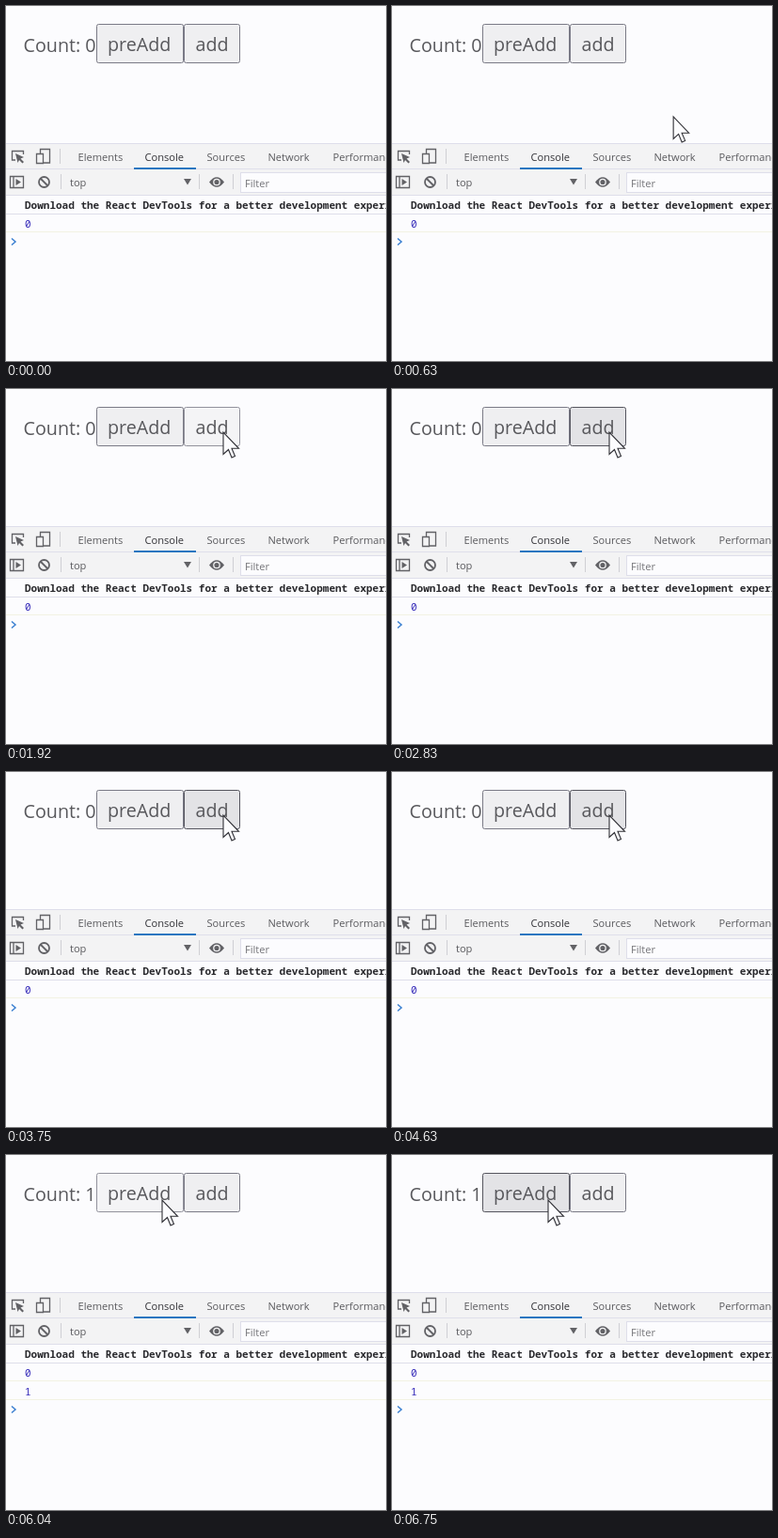
An HTML page that plays this animation: 404 px wide and 378 px high, repeating every 8000 ms.

```html
<!DOCTYPE html>
<html lang="en">
<head>
<meta charset="utf-8">
<title>Counter with console</title>
<style>
html, body { margin: 0; width: 100%; height: 100%; overflow: hidden; background: #fcfcfe; }
svg { display: block; }
text { font-family: "Open Sans", "Noto Sans", sans-serif; font-size: 11.1px; fill: #5a5a5e; white-space: pre; }
.big { font-size: 19.7px; fill: #58585c; }
.mono { font-family: "Noto Sans Mono", "DejaVu Sans Mono", monospace; font-size: 11px; fill: #28282c; }
.warn { font-weight: 600; }
.num { fill: #3328b8; }
.bar { fill: #f3f3f4; }
.rule { stroke: #dedeea; }
.row { stroke: #f2f2e2; }
.sep { stroke: #cfcfd4; }
.icon { fill: none; stroke: #626266; stroke-width: 1.3; }
.solid { fill: #626266; }
.button { fill: #efeff1; stroke: #7a7a86; }
.button.hover { fill: #e3e3e6; stroke: #55555e; }
.button.press { fill: #f4f4f6; stroke: #92929c; }
</style>
</head>
<body>
<svg width="404" height="378" viewBox="0 0 404 378">
  <text class="big" x="18.5" y="49">Count: <tspan id="count">0</tspan></text>
  <rect class="button" id="preAdd" x="96.5" y="19.5" width="92" height="41" rx="2"/>
  <rect class="button" id="add" x="189.5" y="19.5" width="59" height="41" rx="2"/>
  <text class="big" x="108" y="48">preAdd</text>
  <text class="big" x="201.5" y="48">add</text>

  <rect class="bar" y="146" width="404" height="55"/>
  <path class="rule" d="M0 146.5H404M0 173.5H404M0 201.5H404M0 221.5H404"/>
  <path class="row" d="M0 240.5H404"/>
  <path class="row" id="newRule" d="M0 260.5H404"/>
  <path class="sep" d="M57.5 152V168M58.5 179V195M205.5 179V195M241.5 179V195"/>
  <rect x="136" y="172" width="66" height="2" fill="#2a76c0"/>
  <rect class="rule" x="249.5" y="177.5" width="160" height="21" fill="#fcfcfe"/>

  <!-- toolbar icons -->
  <path class="icon" d="M10 164H6.5V154.5H18.5V158"/>
  <path class="solid" d="M10 157L19 161L15.5 162.5L19 166L17.5 167.5L14 164L12.5 167Z"/>
  <path class="icon" d="M36.5 157V152.5H46.5V167H40M32.5 157.5H39.5V167.5H32.5Z"/>
  <path class="icon" d="M4.5 181.5H18.5V193.5H4.5ZM8 181.5V193.5"/>
  <path class="solid" d="M10.5 184L16 187.5L10.5 191Z"/>
  <g class="icon" style="stroke-width:1.8"><circle cx="40.5" cy="187.5" r="5.5"/><path d="M36.5 183.5L44.5 191.5"/></g>
  <path class="solid" d="M189 184H197L193 190.5Z"/>
  <path class="solid" d="M216 187.5Q224 177 232 187.5Q224 198 216 187.5Z"/>
  <circle cx="224" cy="187.5" r="3.2" fill="none" stroke="#f3f3f4" stroke-width="1.3"/>

  <text x="76.5" y="165">Elements</text>
  <text x="147.5" y="165" style="fill:#333338">Console</text>
  <text x="213.5" y="165">Sources</text>
  <text x="278.5" y="165">Network</text>
  <text x="347.5" y="165">Performance</text>
  <text x="68" y="192">top</text>
  <text x="254" y="193" style="fill:#757579">Filter</text>

  <text class="mono warn" x="20" y="216">Download the React DevTools for a better development experience</text>
  <text class="mono num" x="20" y="236">0</text>
  <text class="mono num" id="newLog" x="20" y="256">1</text>
  <path id="prompt" d="M6 247.5L10 251L6 254.5" fill="none" stroke="#3a7fd0" stroke-width="1.5"/>
  <path id="cursor" d="M0 0V23.5L5.5 18.5L9 27L12.5 25.5L9 17.3H16.5Z" fill="#fcfcfe" stroke="#303036" stroke-width="1.1"/>
</svg>
<script>
const LOOP = 8000, COUNT_AT = 4670;
const $ = id => document.getElementById(id);

// Cursor moves: start time, end time, from, to
const moves = [
  [170, 960, [404, 229], [236, 51]],
  [1830, 1920, [236, 51], [231, 46]],
  [5130, 5540, [231, 46], [166, 48]]
];
// Three quick clicks on each button
const presses = [[1560, 1670], [1880, 2000], [2210, 2330], [5750, 5880], [6040, 6170], [6380, 6540]];
const buttons = { preAdd: [96, 189], add: [189, 249] };

const ease = p => p * p * (3 - 2 * p);

function cursorAt(t) {
  const [start, end, from, to] = moves.filter(m => t >= m[0]).pop();
  const p = ease(Math.min(1, (t - start) / (end - start)));
  return from.map((v, i) => v + (to[i] - v) * p);
}

function draw(t) {
  const visible = t >= moves[0][0];
  const [x, y] = visible ? cursorAt(t) : [-50, -50];
  const pressed = presses.some(([a, b]) => t >= a && t < b);
  $("cursor").setAttribute("transform", `translate(${x} ${y})`);

  for (const id in buttons) {
    const [left, right] = buttons[id];
    const over = x >= left && x < right && y >= 19 && y < 61;
    $(id).setAttribute("class", "button" + (over ? pressed ? " press" : " hover" : ""));
  }

  const added = t >= COUNT_AT;
  $("count").textContent = added ? 1 : 0;
  for (const id of ["newLog", "newRule"]) $(id).style.display = added ? "" : "none";
  $("prompt").setAttribute("transform", `translate(0 ${added ? 20 : 0})`);
}

function tick() {
  draw(performance.now() % LOOP);
  requestAnimationFrame(tick);
}
tick();
</script>
</body>
</html>
```
